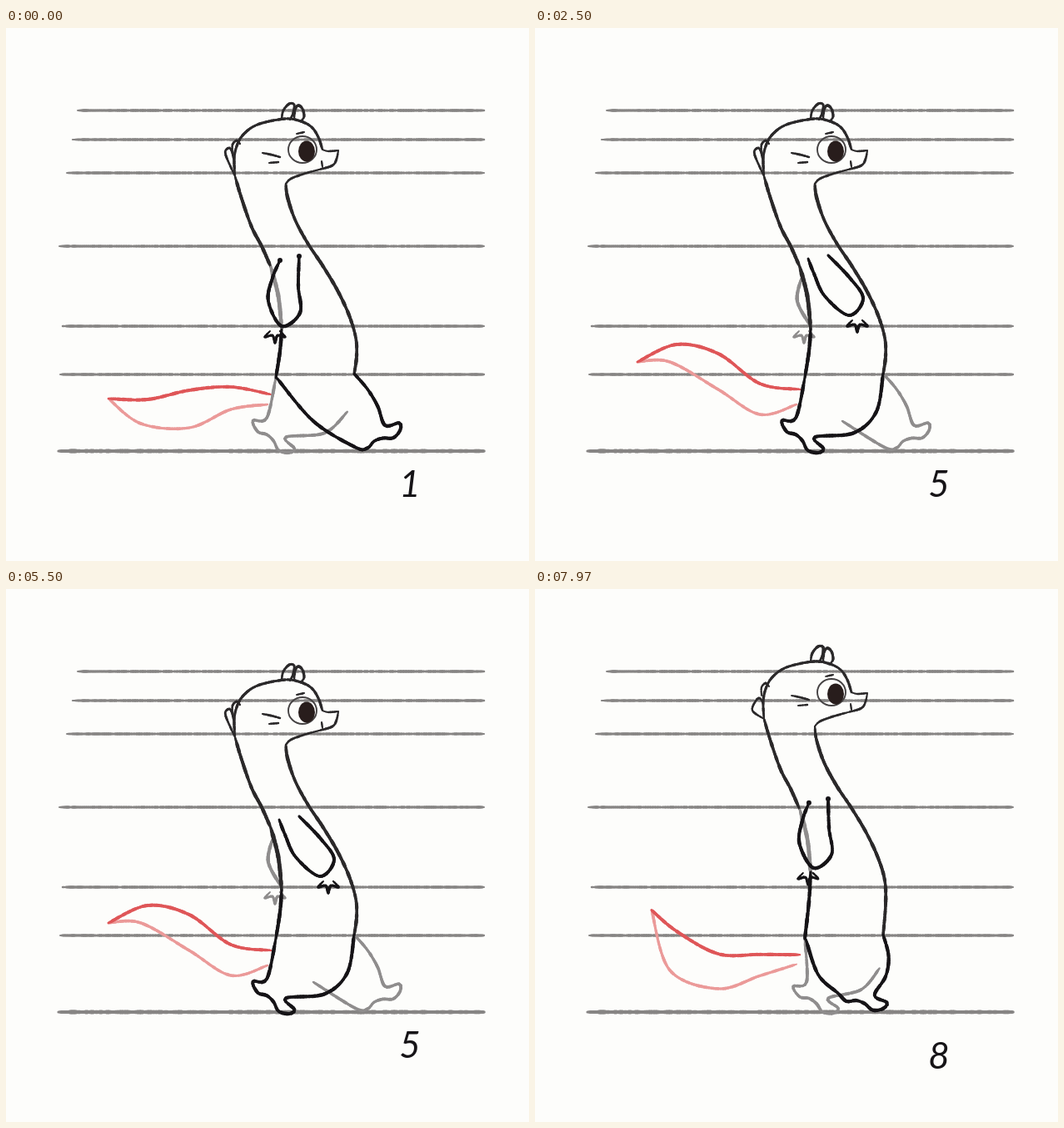
Recreate the animation shown at these times as an HTML page with a canvas. Size 628 by 640 pixels, loop 8010 ms.

```html
<!DOCTYPE html>
<html lang="en">
<head>
<meta charset="utf-8">
<title>Walk cycle</title>
<style>
html, body { margin: 0; width: 100%; height: 100%; overflow: hidden; background: #fdfdfb; }
canvas { display: block; width: 100vw; height: 100vh; }
</style>
</head>
<body>
<canvas id="stage" width="628" height="640"></canvas>
<script>
const ctx = document.getElementById('stage').getContext('2d');
const LOOP = 8010, FRAME = 1000 / 30, TURN = Math.PI * 2;
const PAPER = '#fdfdfb', INK = '#161417', BODY = '#2b292a', FAR = '#8f8d8d', RULE = '#878584';
const RED = '#df5658', PINK = '#eb9a99';

// Height of each rule and where it starts
const rules = [[99, 86], [134, 80], [174, 73], [262, 64], [358, 68], [416, 65], [508, 63]];

// Heel x, heel y and foot angle through one stride: four planted, four swinging
const stride = [[421, 506, -30], [386, 500, 0], [340, 499, 0], [309, 480, 25],
  [295, 474, 33], [286, 452, 68], [281, 429, 105], [363, 488, 10]];
// Sole and toes, measured from the heel
const foot = [0,-3, 12,5, 23,2, 34,4, 45,10, 57,6, 60,-2, 44,-8];

const armBack = [329,279, 320,300, 315,328, 331,358, 353,342, 351,310, 352,274];
const armFwd = [328,277, 335,295, 348,322, 377,345, 394,325, 378,300, 352,273];

// Tail points from root to tip: x, mean y, cosine part, sine part
const tip = [140, 423, 22, 57];
const tailTop = [[318, 437, 3, 0], [270, 429, 2, -26], [220, 413, 22, -37], [170, 413, 33, 11], tip];
const tailLow = [[314, 452, 0, 2], [270, 461, -3, -22], [220, 457, 23, -33], [162, 438, 37, -16], tip];

const clamp = (v, lo, hi) => Math.max(lo, Math.min(hi, v));
const shift = (p, dx, dy) => p.map((v, i) => v + (i % 2 ? dy : dx));
const mix = (a, b, k) => a.map((v, i) => v + (b[i] - v) * k);
const rough = (x, y) => {
  const v = Math.sin(x * 12.9898 + y * 78.233) * 43758.5453;
  return v - Math.floor(v);
};

// Samples a Catmull-Rom curve through flat x,y points
function curve(p) {
  const out = [], n = p.length / 2;
  const at = (i, c) => p[2 * clamp(i, 0, n - 1) + c];
  for (let i = 0; i < n - 1; i++) {
    const len = Math.hypot(at(i + 1, 0) - at(i, 0), at(i + 1, 1) - at(i, 1));
    const steps = Math.max(3, Math.ceil(len / 3));
    for (let s = 0; s < steps; s++) {
      const t = s / steps;
      out.push([0, 1].map(c => {
        const a = at(i - 1, c), b = at(i, c), d = at(i + 1, c), e = at(i + 2, c);
        return b + .5 * t * (d - a + t * (2 * a - 5 * b + 4 * d - e + t * (3 * (b - d) + e - a)));
      }));
    }
  }
  out.push([at(n - 1, 0), at(n - 1, 1)]);
  return out;
}

// Pencil stroke with slightly uneven weight and thin ends
function pencil(p, width, color) {
  const c = curve(p), last = c.length - 1;
  ctx.strokeStyle = color;
  for (let i = 0; i < last; i++) {
    const end = Math.min(1, .65 + Math.min(i, last - i) * .09);
    ctx.lineWidth = width * end * (.84 + .3 * rough(...c[i]));
    ctx.beginPath();
    ctx.moveTo(...c[i]);
    ctx.lineTo(...c[i + 1]);
    ctx.stroke();
  }
}

function oval(x, y, rx, ry) {
  ctx.beginPath();
  ctx.ellipse(x, y, rx, ry, 0, 0, TURN);
}

function tail(points, phase, width, color) {
  const path = points.flatMap(([x, mean, c, s], i) => {
    const whip = 18 * Math.sin(i * .59) * Math.sin(2 * phase);
    const reach = i === 4 ? 17 * Math.cos(2 * phase) : 0;
    return [x - reach, mean + c * Math.cos(phase) + s * Math.sin(phase) + whip];
  });
  pencil(path, width, color);
}

function head(dy, phase) {
  const line = (p, w = 3.1) => pencil(shift(p, 0, dy), w, BODY);
  line([275,178, 274,160, 276,145, 284,129, 302,116, 335,109, 354,112, 367,119, 375,131, 380,146]);
  line([380,146, 387,148, 399,147], 2.7);
  line([399,147, 397,157, 392,165, 376,170], 2.7);
  line([376,170, 358,175, 342,181, 336,187], 2.8);
  line([379,160, 380,167], 3);
  line([349,127, 358,125], 3);
  line([308,150, 318,152, 329,155], 3);
  line([316,162, 327,161], 3);
  line([272,150, 272,140, 277,135, 281,139], 2.7);

  // The low ear trails the bob, the top ears lean as the legs pass
  const lag = 3.5 - 3 * Math.cos(2 * phase) - 8 * Math.sin(2 * phase);
  line([275,178, 264 - lag * .25,152 + lag * 1.4, 265,145 + lag, 270,145 + lag * .7, 274,160], 2.7);
  const lean = Math.max(0, -Math.cos(2 * phase)) * .32;
  const ear = p => line(p.map((v, i) => i % 2 ? 110 - (110 - v) * (1 - lean * .5) : v + (110 - p[i + 1]) * lean), 3.2);
  ear([331,109, 333,99, 340,91, 346,92, 345,102, 341,110]);
  ear([346,110, 347,98, 351,93, 356,97, 358,106, 355,111]);

  ctx.strokeStyle = '#454243';
  ctx.lineWidth = 1.9;
  oval(356, 146 + dy, 17, 16);
  ctx.stroke();
  ctx.fillStyle = '#281d1c';
  oval(361, 148 + dy, 10, 12.5);
  ctx.fill();
}

function torso(dy, armIsBack) {
  pencil(shift([275,178, 283,205, 295,239, 307,262, 318,287], 0, dy), 3.9, BODY);
  pencil(shift([318,287, 327,322, 331,362], 0, dy), 4.8, armIsBack ? FAR : BODY);
  pencil([331,362 + dy, 329,388 + dy * .6, 324,420], 4.3, INK);
  pencil([...shift([336,187, 338,203, 347,230, 362,258, 380,285, 398,315, 412,345, 420,372], 0, dy),
    421,394 + dy * .7, 418,416], 3.9, BODY);
}

function arm(k, dy, far) {
  const p = shift(mix(armBack, armFwd, k), 0, dy), color = far ? FAR : INK;
  pencil(far ? p.slice(2, 8) : p, 4, color);
  if (!far && k < .3) {
    ctx.fillStyle = color;
    for (const i of [0, 12]) { oval(p[i], p[i + 1], 3, 3); ctx.fill(); }
  }
  const fingers = [];
  for (let i = 0; i < 7; i++) {
    const a = Math.PI * (1 - i / 6), r = i % 2 ? 14 : 6;
    fingers.push(p[6] - 8 + 18 * k + r * Math.cos(a), p[7] + 6 + r * Math.sin(a));
  }
  pencil(fingers, 3, color);
}

// One outline: back of the leg, foot, then front of the leg up to the belly
function leg(step, far) {
  const [hx, hy, deg] = stride[step];
  const a = deg * TURN / 360, cos = Math.cos(a), sin = Math.sin(a);
  const place = (x, y) => [hx + x * cos - y * sin, hy + x * sin + y * cos];
  const ahead = hx > 330;

  const back = ahead ? [(325 + hx) / 2 - 4, (420 + hy) / 2 + 9] : [324, 420, ...place(12, -15)];
  if (ahead && !far) back.unshift(325, 420);

  const sole = [];
  for (let i = 0; i < foot.length; i += 2) sole.push(...place(foot[i], foot[i + 1]));

  const [tx, ty] = sole.slice(-2), dx = 418 - tx, dy = 415 - ty;
  const bulge = clamp(.25 - (tx - 340) / 600, .04, .25);
  const front = [];
  for (const t of [1 / 3, 2 / 3]) front.push(tx + dx * t - dy * bulge, ty + dy * t + dx * bulge);
  if (ahead || !far) front.push(418, 415);

  pencil([...back, ...sole, ...front], far ? 3.6 : 4, far ? FAR : INK);
}

function draw(pose) {
  const phase = pose / 8 * TURN, other = (pose + 4) % 8;
  const dy = -6 + 6 * Math.cos(2 * phase) + 16 * Math.sin(2 * phase);
  const swing = clamp(.5 - .6 * Math.cos(phase), 0, 1);

  ctx.fillStyle = PAPER;
  ctx.fillRect(0, 0, 628, 640);
  for (const [y, x] of rules) pencil([x, y, 574, y], y > 500 ? 4.4 : 3.2, RULE);

  tail(tailLow, phase, 3.4, PINK);
  tail(tailTop, phase, 3.8, RED);
  leg(other, true);
  if (swing > .7) arm(1 - swing, dy, true);
  torso(dy, swing < .3);
  leg(pose, false);
  arm(swing, dy, false);
  head(dy, phase);

  ctx.fillStyle = INK;
  ctx.font = 'italic 44px Lato, sans-serif';
  ctx.textAlign = 'center';
  ctx.fillText(pose + 1, 485, pose > 5 ? 576 : 563);
}

let shown = -1;
const start = performance.now();
function tick() {
  const t = (performance.now() - start) % LOOP;
  const frame = Math.min(239, Math.floor((t + 5) / FRAME));
  const pose = Math.floor((frame % 30) * 8 / 30);
  if (pose !== shown) draw(shown = pose);
  requestAnimationFrame(tick);
}

ctx.lineCap = ctx.lineJoin = 'round';
tick();
</script>
</body>
</html>
```
